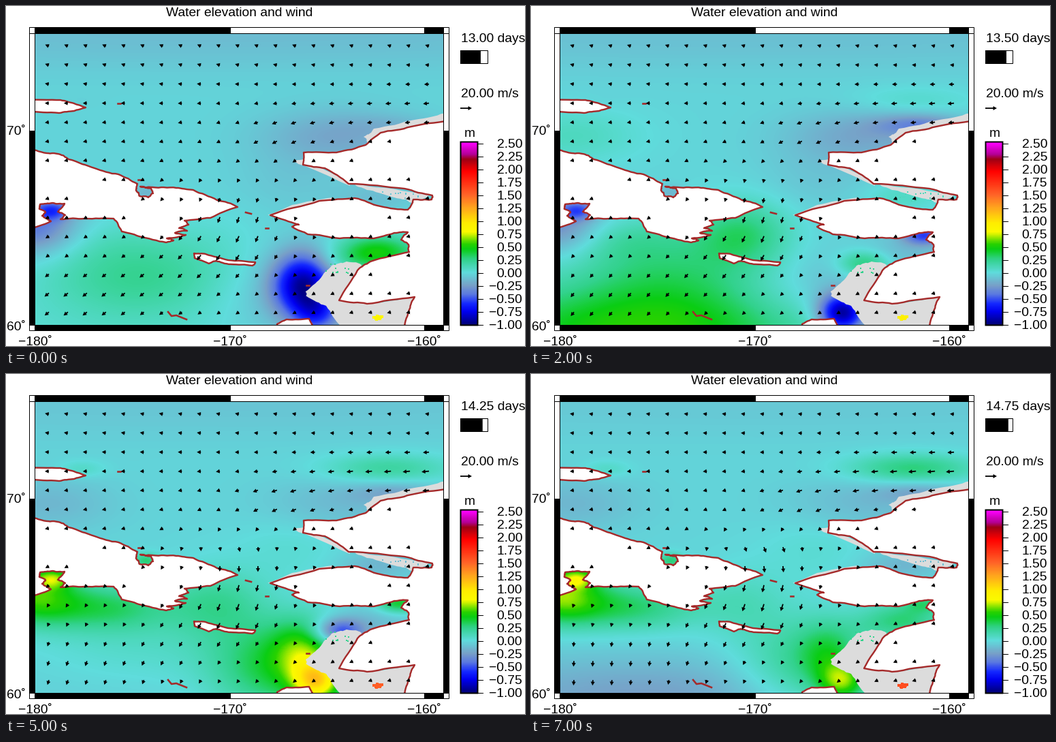
Write a matplotlib script that moves like this. It is 762x499 px and loops after 8 s.

```python
import numpy as np
import matplotlib.pyplot as plt
from matplotlib.animation import FuncAnimation
from matplotlib.collections import PolyCollection
from matplotlib.colors import LinearSegmentedColormap
from matplotlib.patches import Polygon, Rectangle

W, H, DPI = 762, 499, 100
LEFT, TOP, RIGHT, BOTTOM = 42, 40, 642, 468
PX = 72 / DPI
BROWN, FLAT = "#a52a2a", "#dcdcdc"
LOW, HIGH = -1.0, 2.5
STEPS = 8
step = np.arange(STEPS)

rng = np.random.default_rng(4)
plt.rcParams["font.family"] = "Liberation Sans"
plt.rcParams["font.size"] = 19.3 * PX

fig = plt.figure(figsize=(W / DPI, H / DPI), dpi=DPI, facecolor="white")
ax = fig.add_axes([0, 0, 1, 1])
ax.axis("off")

stops = [(-1, "#000078"), (-0.75, "#0000f0"), (-0.6, "#1428ff"),
         (-0.42, "#5a78e1"), (-0.25, "#78a0c8"), (0, "#5fdcdc"),
         (0.25, "#32d28c"), (0.45, "#0acd14"), (0.55, "#28d200"),
         (0.78, "#fafa00"), (0.95, "#ffee00"), (1.25, "#ffa51e"),
         (1.5, "#ff6428"), (1.95, "#ff0000"), (2.18, "#a00014"),
         (2.28, "#b40096"), (2.5, "#ff00ff")]
cmap = LinearSegmentedColormap.from_list(
    "water", [((v - LOW) / (HIGH - LOW), c) for v, c in stops], N=512)


def heat(values, x0, y0, x1, y1, z):
    return ax.imshow(values, cmap=cmap, vmin=LOW, vmax=HIGH, zorder=z,
                     extent=(x0, x1, y1, y0), aspect="auto",
                     interpolation="bilinear")


def label(x, y, s, ha="left"):
    return ax.text(x, y, s, ha=ha, va="baseline", zorder=9)


def box(x0, y0, x1, y1, fill="white", lw=1, z=6):
    """Rectangle whose outline runs through pixel centres."""
    patch = Rectangle((x0 + .5, y0 + .5), x1 - x0, y1 - y0, fc=fill,
                      ec="black", lw=lw * PX, zorder=z, snap=False)
    return ax.add_patch(patch)


# ---- water elevation: a sum of swells, each with its own tide ----
gx, gy = np.meshgrid(np.linspace(LEFT, RIGHT, 301), np.linspace(TOP, BOTTOM, 215))
fields = np.full((STEPS,) + gx.shape, -0.03)


def tide(mean, half=0, day_cos=0, day_sin=0, drift=0):
    """Half-day and daily tide, sampled every six hours."""
    quarter = step * np.pi / 2
    return (mean + half * np.cos(2 * quarter) + day_cos * np.cos(quarter)
            + day_sin * np.sin(quarter) + drift * step / (STEPS - 1))


def swell(x, y, sx, sy, **level):
    bump = np.exp(-((gx - x) / sx) ** 2 / 2 - ((gy - y) / sy) ** 2 / 2)
    fields[:] += tide(**level)[:, None, None] * bump


# Arctic side
swell(340, 40, 700, 38, mean=-.10, drift=.05)
swell(490, 190, 80, 28, mean=-.15, half=-.04)
swell(575, 174, 45, 11, mean=-.16, day_cos=.10)
swell(560, 138, 65, 15, mean=0, drift=.32)
swell(60, 190, 70, 28, mean=-.03, half=.09, day_cos=-.06)
swell(110, 139, 25, 9, mean=.05, half=-.06)
swell(205, 274, 14, 8, mean=.09, half=-.22)
swell(420, 255, 60, 35, mean=0, half=-.06)
swell(545, 280, 40, 14, mean=-.06, half=.07, day_cos=-.10)
# western gulf
swell(40, 325, 45, 28, mean=.10, half=-.46, day_cos=-.04, day_sin=-.05)
swell(68, 300, 19, 10, mean=.04, half=-.42)
swell(140, 343, 70, 24, mean=.21, half=-.12, day_cos=-.05)
swell(195, 395, 100, 42, mean=.15, half=.10, day_sin=.04)
swell(160, 478, 200, 45, mean=.09, half=.21, day_cos=-.24, day_sin=.10)
swell(310, 335, 50, 35, mean=.17, day_cos=-.14, day_sin=.05)
# eastern bays
swell(395, 430, 65, 48, mean=.12, half=-.22, day_sin=.07)
swell(437, 410, 31, 32, mean=-.05, half=-.40, day_cos=-.40, day_sin=.07)
swell(458, 452, 24, 20, mean=0, half=-.68, day_cos=.28, day_sin=.12)
swell(490, 378, 26, 13, mean=-.03, half=.23, day_cos=-.12, day_sin=-.29)
swell(545, 362, 42, 18, mean=.16, half=.05, day_cos=.31, day_sin=-.20)
swell(578, 337, 22, 10, mean=.05, half=-.30, day_cos=.25, day_sin=.10)

sea = heat(fields[0], LEFT, TOP, RIGHT, BOTTOM, 1)
map_clip = Rectangle((LEFT, TOP), RIGHT - LEFT, BOTTOM - TOP,
                     transform=ax.transData)


# ---- coasts: a few key points, made ragged by midpoint displacement ----
def rough(points, amp, rounds=3):
    p = np.array(points, float)
    for _ in range(rounds):
        mid = (p[:-1] + p[1:]) / 2
        mid += rng.uniform(-amp, amp, mid.shape)
        out = np.empty((2 * len(p) - 1, 2))
        out[::2], out[1::2] = p, mid
        p, amp = out, amp * 0.6
    return p


def area(points, fill=FLAT, edge="none", amp=2.0, z=2):
    patch = Polygon(rough(points + points[:1], amp), fc=fill, ec=edge,
                    lw=2.4 * PX, zorder=z, joinstyle="round")
    ax.add_patch(patch).set_clip_path(map_clip)
    return patch


def land(points, amp=1.2):
    return area(points, "white", BROWN, amp, 3)


# tidal flats
area([(440, 419), (465, 395), (478, 381), (500, 375), (522, 380), (500, 430),
      (545, 436), (604, 425), (600, 470), (492, 470), (470, 440), (440, 425)])
area([(525, 192), (540, 180), (600, 167), (650, 156), (650, 172), (530, 202)])
area([(500, 256), (520, 262), (622, 276), (600, 291), (570, 281), (530, 270)])
area([(384, 307), (420, 292), (480, 281), (482, 287), (400, 308)], amp=1)
area([(421, 228), (437, 225), (500, 255), (505, 264), (437, 234)], amp=1)

wrangel = land([(30, 137), (80, 138), (100, 143), (117, 149), (100, 154),
                (78, 157), (30, 154)], .7)
west = land([
    (30, 209), (60, 216), (80, 218), (92, 225), (130, 238), (165, 247),
    (193, 261), (191, 271), (196, 279), (209, 281), (216, 275), (213, 268),
    (197, 265), (215, 266), (250, 267), (275, 270), (310, 285), (340, 295),
    (300, 311), (262, 315), (268, 321), (254, 326), (266, 330), (248, 333),
    (264, 336), (236, 341), (246, 344), (235, 347), (195, 338), (170, 331),
    (158, 312), (115, 312), (80, 313), (87, 307), (76, 302), (86, 290),
    (68, 289), (50, 291), (49, 298), (58, 303), (53, 308), (66, 316),
    (30, 329)])
island = land([(276, 363), (293, 364), (326, 373), (366, 376), (362, 381),
               (330, 379), (308, 374), (298, 378), (277, 370)], .9)
east = land([
    (660, 168), (595, 177), (550, 186), (528, 204), (485, 215), (437, 215),
    (436, 233), (468, 238), (503, 261), (585, 268), (626, 278), (625, 284),
    (598, 284), (590, 299), (550, 294), (512, 282), (460, 286), (388, 307),
    (430, 321), (420, 324), (443, 335), (490, 341), (540, 341), (570, 333),
    (590, 332), (580, 343), (591, 350), (592, 361), (535, 375), (516, 388),
    (489, 432), (530, 437), (600, 427), (591, 449), (583, 478), (660, 478)])
land([(398, 467), (412, 460), (445, 459), (456, 478), (398, 478)], .7)


def islet(*points):
    ax.plot(*zip(*points), color=BROWN, lw=2.6 * PX, zorder=3)


islet((238, 449), (243, 455), (250, 454), (265, 460))
islet((352, 303), (360, 305))
for x, y in [(166, 143), (383, 326), (443, 410), (196, 255)]:
    islet((x - 2, y), (x + 2, y))


# ---- pools left on the flats ----
def pool(x, y, spread, count, size, z, **level):
    px, py = rng.normal(x, spread, count), rng.normal(y, spread / 2, count)
    dots = ax.scatter(px, py, s=size, marker="s", lw=0, zorder=z)
    return dots, cmap((tide(**level) - LOW) / (HIGH - LOW))


pools = [pool(548, 457, 3.5, 14, 5, 2.5, mean=1.1, half=-.25, drift=.25),
         pool(490, 388, 10, 12, 1.2, 2.5, mean=.25),
         pool(575, 281, 16, 24, 4, 2.5, mean=-.06, half=.07, day_cos=-.1)]


# ---- wind ----
def far_inland(x, y):
    return any(p.get_path().contains_point((x, y))
               and np.hypot(*(p.get_xy() - (x, y)).T).min() > 18
               for p in (west, east))


grid = [(x, y) for y in 59 + 27.87 * np.arange(15)
        for x in 63 + 27.9 * np.arange(21) if not far_inland(x, y)]


def wind(x, y, t):
    def gust(cx, cy, sx, sy, u, v):
        k = np.exp(-((x - cx) / sx) ** 2 / 2 - ((y - cy) / sy) ** 2 / 2)
        return np.array([u, v]) * k

    return (np.array([-1.5, .3])
            + gust(340, 50, 500, 50, -2 - t, -2 + t)
            + gust(640, 150, 200, 42, -7 - 3 * t, 1)
            + gust(400, 200, 70, 35, -4, 3)
            + gust(350, 318, 75, 50, 0, 8 + t)
            + gust(350, 258, 55, 22, 6 * t, 3 * t)
            + gust(90, 430, 170, 65, -5 + 6 * t, 5 + 3 * t)
            + gust(300, 370, 90, 50, -3, 2))


def arrow(x, y, u, v):
    size = np.hypot(u, v)
    ex, ey = u / size, v / size
    size = max(size, 6)
    neck = size - 5.5
    outline = [(0, .9), (neck, .9), (neck, 3), (size, 0),
               (neck, -3), (neck, -.9), (0, -.9)]
    return [(x + a * ex - b * ey, y + a * ey + b * ex) for a, b in outline]


winds = PolyCollection([], fc="black", ec="none", zorder=4)
ax.add_collection(winds).set_clip_path(map_clip)

# ---- map frame ----
edges = [34, 42, 329, 614, 642, 650]
for i, (x0, x1) in enumerate(zip(edges, edges[1:])):
    fill = "black" if i % 2 else "white"
    box(x0, 31, x1, 40, fill)
    box(x0, 468, x1, 476, fill)
for x in (34, 642):
    box(x, 40, x + 8, 183)
    box(x, 183, x + 8, 468, "black")

label(343, 15, "Water elevation and wind", "center")
for i, lon in enumerate((180, 170, 160)):
    label(43 + 285.7 * i, 498, f"\u2212{lon}\u02da", "center")
label(29, 189, "70\u02da", "right")
label(29, 476, "60\u02da", "right")

# ---- side panel ----
label(668, 134, "20.00 m/s")
ax.add_patch(Polygon(arrow(667, 150, 17, 0), fc="black", lw=0, zorder=6))
label(673, 192, "m")
heat(np.linspace(HIGH, LOW, 270)[:, None], 667, 200, 692, 468, 5)
box(667, 199, 692, 468, "none", 2)
for i in range(15):
    value, y = HIGH - i * .25, 201.5 + i * 19.07
    ax.plot([692, 700], [y, y], color="black", lw=PX, zorder=6)
    label(758, y + 6, f"{value:.2f}".replace("-", "\u2212"), "right")

days_text = label(668, 53, "")
box(667, 65, 707, 84)
progress = box(667, 65, 697, 84, "black", z=7)

ax.set_xlim(0, W)
ax.set_ylim(H, 0)


def draw(i):
    days = 13 + i / 4
    days_text.set_text(f"{days:.2f} days")
    progress.set_width(40 * days / 18)
    sea.set_data(fields[i])
    for dots, colors in pools:
        dots.set_facecolor(colors[i])
    t = i / (STEPS - 1)
    winds.set_verts([arrow(x, y, *wind(x, y, t)) for x, y in grid])
    return sea, winds, days_text, progress


anim = FuncAnimation(fig, draw, frames=STEPS, interval=1000, repeat=True,
                     repeat_delay=0, blit=False)
plt.show()
```
